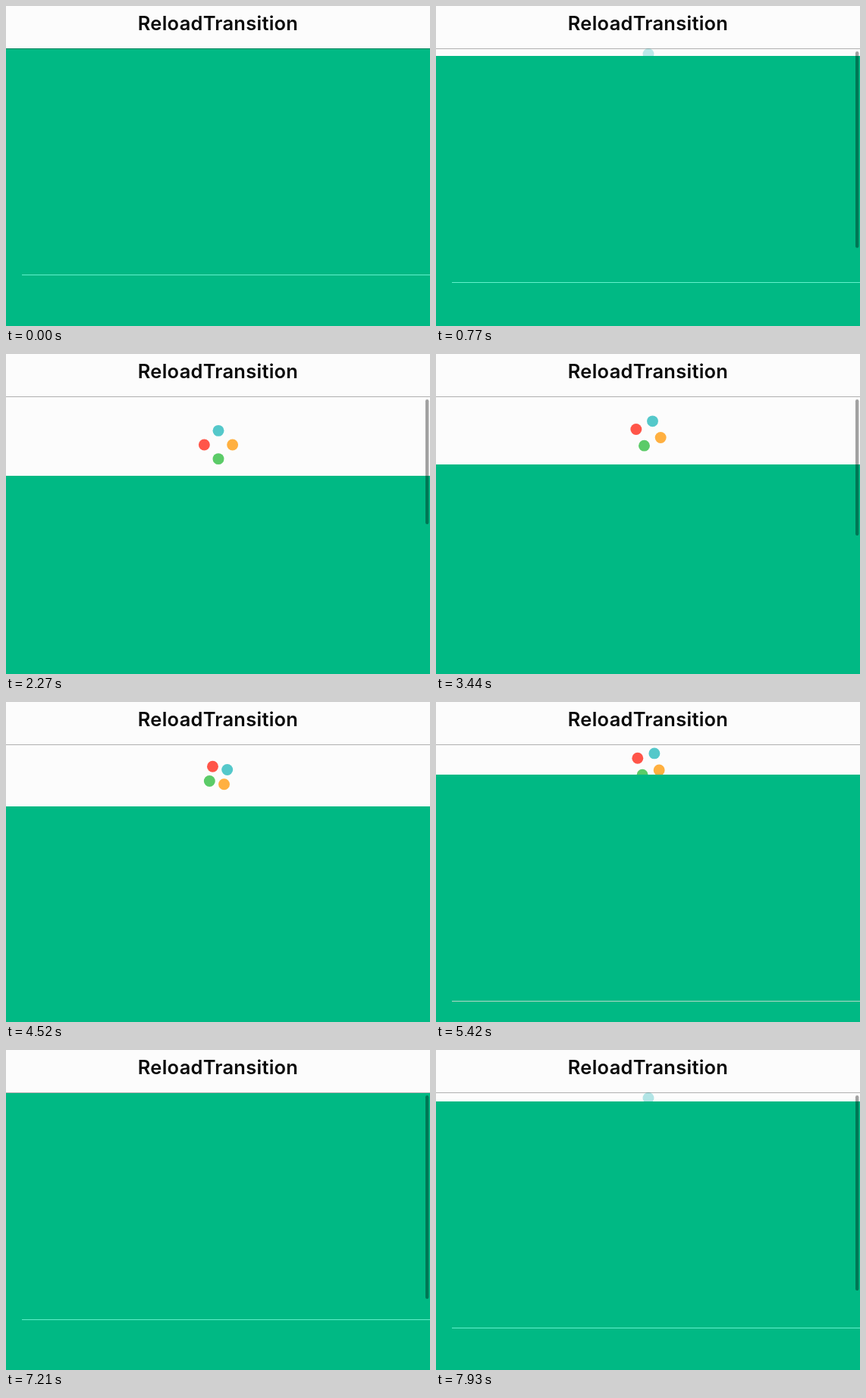
An HTML page with a canvas for the animation above (8 s loop, 559 by 423 pixels).

```html
<!DOCTYPE html>
<html lang="en">
<head>
<meta charset="utf-8">
<title>Pull to refresh</title>
<style>
  html, body { margin: 0; width: 559px; height: 423px; overflow: hidden; background: #fcfcfc; }
  canvas { position: absolute; left: 0; top: 0; }
  h1 {
    position: absolute; left: 0; top: 0; width: 559px; margin: 0;
    font: 600 25.5px/46px Inter, Roboto, sans-serif; letter-spacing: .25px;
    text-align: center; color: #0a0a0a;
  }
</style>
</head>
<body>
<canvas id="stage" width="559" height="423"></canvas>
<h1>ReloadTransition</h1>
<script>
const W = 559, H = 423, LOOP = 8000, NAV = 56, CX = 280;
const PT = 1.4907;            // pixels per point
const R = 5 * PT;             // dot radius
const ORBIT = 12.5 * PT;
const HEADER = 35 * PT, PULL = 55 * PT;
const SPIN_START = 3389, SPIN_END = 5870, SPIN_TIME = 976;

const TEAL = [84, 200, 202], RED = [255, 85, 73], GREEN = [91, 203, 104], AMBER = [255, 176, 64];
const COLORS = [TEAL, RED, GREEN, AMBER];
const DIRS = [[0, -1], [-1, 0], [0, 1], [1, 0]];

// Screen updates: start, interval, number of intervals
const RUNS = [[0, 1, 0], [500, 88.5, 20], [2900, 1, 0], [3080, 1, 0], [3440, 90, 27], [7210, 90, 8]];

// Pull distance: time, pixels, eased arrival
const PULLS = [
  [0, 0], [410, 0], [500, 1], [700, 7], [900, 17], [1100, 32], [1300, 53], [1385, 63],
  [1600, 82], [1850, 95], [2180, 104], [2270, 105], [2840, 105], [2900, 106], [3020, 106],
  [3080, 107], [3389, 107], [3440, 90], [3530, 85], [3620, 83], [3710, 82],
  [5000, 82], [5830, 0, true], [7120, 0], [7210, 1], [7600, 5], [7930, 12], [8000, 14]
];

const ctx = document.getElementById('stage').getContext('2d');
const clamp = (v, a, b) => Math.min(b, Math.max(a, v));
const rgb = c => `rgb(${c.map(Math.round)})`;
const mix = (a, b, k) => a.map((v, i) => v + (b[i] - v) * k);

function snap(t) {
  const [start, step, count] = RUNS.filter(r => r[0] <= t).pop();
  return start + step * Math.min(count, Math.floor((t - start) / step + 1e-6));
}

function pullAt(t) {
  const i = Math.max(1, PULLS.findIndex(k => k[0] >= t));
  const [t0, a] = PULLS[i - 1], [t1, b, eased] = PULLS[i];
  let k = clamp((t - t0) / (t1 - t0), 0, 1);
  if (eased) k = (1 - Math.cos(Math.PI * k)) / 2;
  return a + (b - a) * k;
}

function dot(x, y, color, alpha = 1) {
  ctx.globalAlpha = alpha;
  ctx.fillStyle = rgb(color);
  ctx.beginPath();
  ctx.arc(x, y, R, 0, 7);
  ctx.fill();
  ctx.globalAlpha = 1;
}

// Thick stroke running along one side of the diamond
function link(cy, stage, from, to, color) {
  const a = DIRS[stage], b = DIRS[(stage + 1) % 4];
  const at = k => [CX + ORBIT * (a[0] + (b[0] - a[0]) * k), cy + ORBIT * (a[1] + (b[1] - a[1]) * k)];
  ctx.strokeStyle = rgb(color);
  ctx.lineWidth = R * 2;
  ctx.lineCap = 'round';
  ctx.beginPath();
  ctx.moveTo(...at(from));
  ctx.lineTo(...at(to));
  ctx.stroke();
}

function drawPulled(cy, pull, lagged) {
  const p = lagged / PT - 15;
  if (p >= 0 && p < 40) {
    const stage = Math.floor(p / 10), sub = p - stage * 10;
    const from = sub <= 5 ? 0 : Math.max(.6, (sub - 5) / 5);
    const to = Math.min(1, sub / 5);
    const old = stage ? clamp(1 - sub / 2.3, 0, 1) : 0;
    link(cy, stage, from, to, mix(COLORS[stage], COLORS[Math.max(0, stage - 1)], old));
  }
  DIRS.forEach(([x, y], i) => {
    if (i && p < i * 10) return;
    dot(CX + x * ORBIT, cy + y * ORBIT, COLORS[i], i ? 1 : Math.min(1, pull / PT / 18));
  });
}

function drawSpinning(cy, t) {
  const phase = (t - SPIN_START) / SPIN_TIME;
  const pulse = 1 - Math.abs(1 - (phase * 4) % 2);
  const r = ORBIT - R * pulse;
  const s = Math.sin(phase * 2 * Math.PI), c = Math.cos(phase * 2 * Math.PI);
  DIRS.forEach(([x, y], i) => dot(CX + r * (x * c - y * s), cy + r * (x * s + y * c), COLORS[i]));
}

function drawScrollbar(t, pull) {
  const active = (t >= 500 && t < 4160) || t >= 7210;
  if (!active) return;
  const settled = t >= SPIN_START && t < 5000;
  const alpha = settled ? clamp((4050 - t) / 300, 0, 1) : 1;
  const extra = settled ? clamp((t - 3440) / 180, 0, 1) * 9 : 0;
  ctx.fillStyle = `rgba(0,0,0,${.36 * alpha})`;
  ctx.beginPath();
  ctx.roundRect(553, 60, 4.4, 270 - pull + extra, 2.2);
  ctx.fill();
}

function draw(time) {
  const t = snap(time), pull = pullAt(t);
  const top = NAV + Math.round(pull);
  const cy = pull < HEADER ? NAV + HEADER / 2 : top - Math.min(pull, PULL) / 2;

  ctx.fillStyle = '#fcfcfc';
  ctx.fillRect(0, 0, W, H);
  if (t >= SPIN_START && t < SPIN_END) drawSpinning(cy, t);
  else if (pull > 0) drawPulled(cy, pull, pullAt(Math.max(0, t - 70)));

  ctx.fillStyle = '#00b984';
  ctx.fillRect(0, top, W, H);
  ctx.fillStyle = pull > 20 ? '#b4d8c8' : '#62f0cb';
  ctx.fillRect(21, top + 299, W, 1);
  drawScrollbar(t, pull);

  ctx.fillStyle = '#fcfcfc';
  ctx.fillRect(0, 0, W, NAV);
  ctx.fillStyle = 'rgba(0,0,0,.3)';
  ctx.fillRect(0, NAV, W, 1);
}

const begin = performance.now();
function tick() {
  draw((performance.now() - begin) % LOOP);
  requestAnimationFrame(tick);
}
tick();
</script>
</body>
</html>
```
